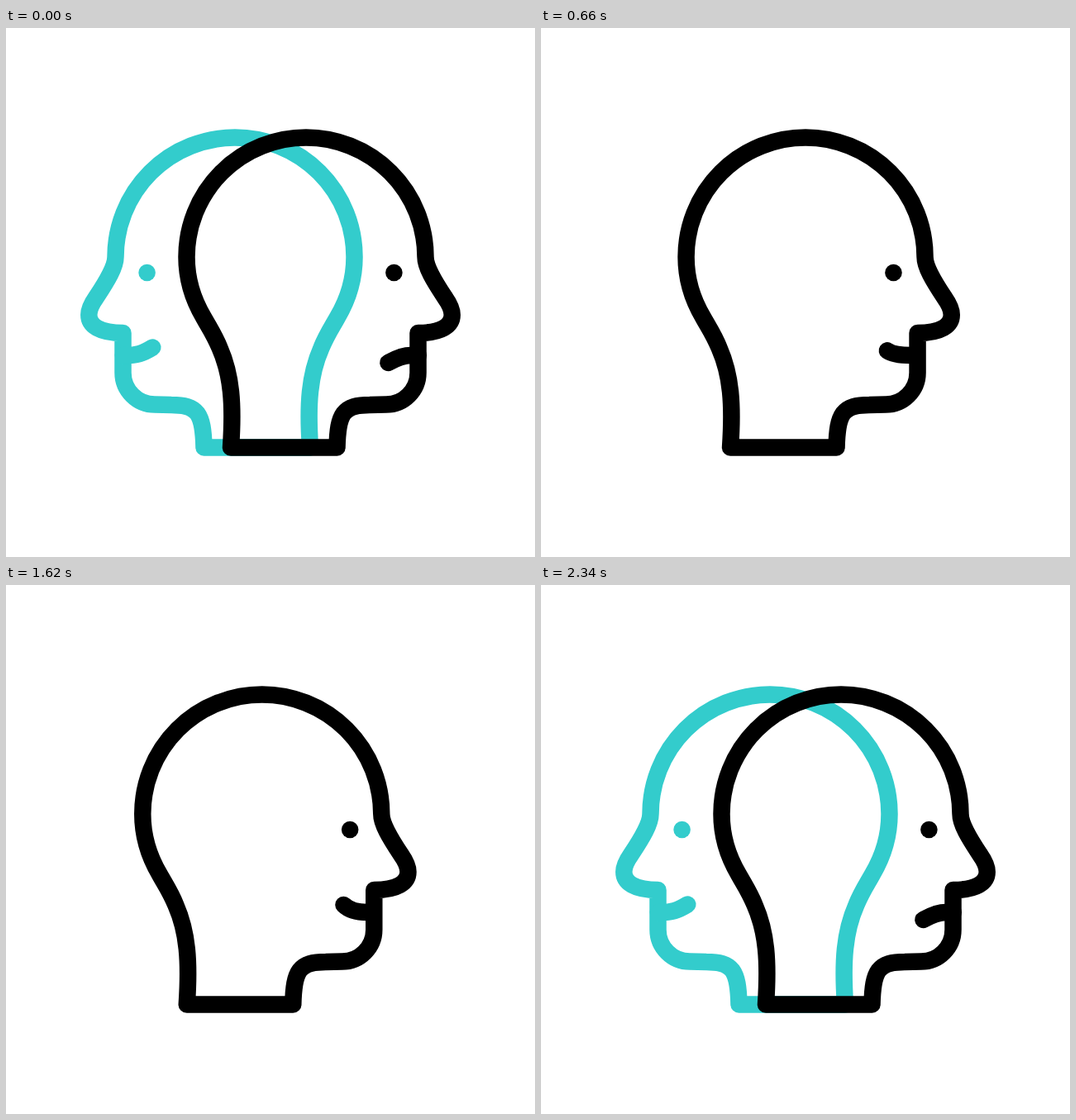
Recreate the animation shown at these times as an HTML page. Size 640 by 640 pixels, loop 2.4 s.

```html
<!DOCTYPE html>
<html lang="en">
<head>
<meta charset="utf-8">
<title>Two faces</title>
<style>
  html, body { margin: 0; width: 100%; height: 100%; overflow: hidden; background: #fff; }
  svg { display: block; width: 100%; height: 100%; }
  .line { fill: none; stroke-width: 20.5; stroke-linecap: round; stroke-linejoin: round; }
  #back .line { stroke: #3cc; }
  #back circle { fill: #3cc; }
  #front .line { stroke: #000; }
</style>
</head>
<body>
<svg viewBox="0 0 640 640">
  <g id="back">
    <path id="backHead" class="line" pathLength="1"/>
    <path class="line" d="M498.2 396C482 396.5 474 393.5 462.7 386.5"/>
    <circle cx="469.4" cy="296" r="10.3"/>
  </g>
  <g id="front">
    <path id="frontHead" class="line"/>
    <path id="frontMouth" class="line"/>
    <circle cx="469.4" cy="296" r="10.3"/>
  </g>
</svg>
<script>
const LOOP = 2400, STEP = 20;
const TURN = 1200, END = 2320;           // front head reaches its far side, then returns
const ERASED = 616, REDRAW = 1800;       // back outline is gone between these times
const FRONT_SHIFT = -65.5, BACK_SHIFT = 160;

const HEAD = [
  'M258.5 387C252 371 245 361 239 350',       // back of the neck
  'C226 328 218.5 303 218.5 277',
  'A144.5 144.5 0 0 1 507.5 277',             // skull
  'C507.5 289 517 305 531 326',               // brow and nose
  'C537 334.5 539.7 341 539.7 347',
  'C539.7 360 527 369 498.5 369',
  'V417A38.5 38.5 0 0 1 460 455.5',           // jaw
  'L440 456C408 456 401.5 466 400.5 507.5',
  'H272C275.5 455 273 420 258.5 387Z'
].join('');

// Mouth: corner, two control points, start and end of the straight part.
const FROWN = [462.4, 405, 468, 402, 478, 396, 490, 396, 498.8, 396];
const SMILE = [461.5, 382.7, 467.5, 390.5, 476, 396, 490, 396, 497, 396];

const byId = id => document.getElementById(id);
const back = byId('back'), front = byId('front');
const backHead = byId('backHead'), mouth = byId('frontMouth');
backHead.setAttribute('d', HEAD);
byId('frontHead').setAttribute('d', HEAD);

// Cubic-bezier easing (0.7, 0, 0.3, 1), solved by bisection.
function ease(x) {
  if (x <= 0) return 0;
  if (x >= 1) return 1;
  let lo = 0, hi = 1, s;
  for (let i = 0; i < 30; i++) {
    s = (lo + hi) / 2;
    const at = 2.1 * (1 - s) ** 2 * s + 0.9 * (1 - s) * s * s + s ** 3;
    if (at < x) lo = s; else hi = s;
  }
  return s * s * (3 - 2 * s);
}

const progress = (t, from, to) => ease((t - from) / (to - from));

function draw(t) {
  const move = t < TURN ? progress(t, 0, TURN) : 1 - progress(t, TURN, END);
  const shown = t < TURN ? 1 - progress(t, 0, ERASED) : progress(t, REDRAW, END);

  front.setAttribute('transform', `translate(${FRONT_SHIFT * move} 0)`);
  const p = FROWN.map((v, i) => v + (SMILE[i] - v) * move);
  mouth.setAttribute('d', `M${p.slice(0, 2)}C${p.slice(2, 8)}L${p.slice(8)}`);

  back.setAttribute('transform', `translate(${640 + BACK_SHIFT * move} 0) scale(-1 1)`);
  back.style.display = shown > 0 ? '' : 'none';
  backHead.setAttribute('stroke-dasharray', shown < 1 ? `${shown} 2` : 'none');
}

function tick() {
  const t = performance.now() % LOOP;
  draw(Math.floor(t / STEP) * STEP);
  requestAnimationFrame(tick);
}
tick();
</script>
</body>
</html>
```
